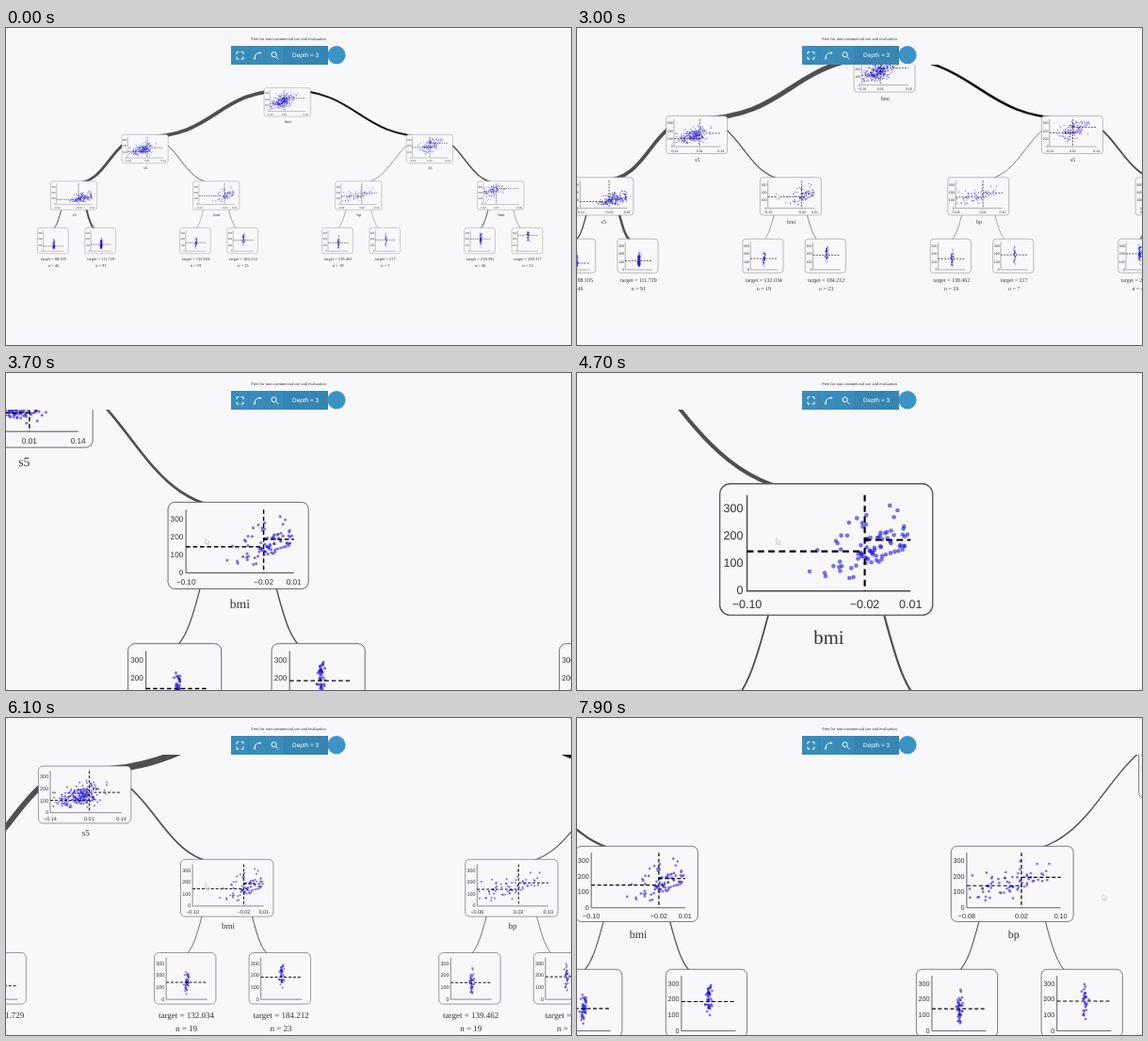
These frames come from a looping animation (600x337 px, 8 s). An HTML page:

```html
<!DOCTYPE html>
<html lang="en">
<head>
<meta charset="utf-8">
<title>Decision tree zoom</title>
<style>
  html, body { margin: 0; width: 100%; height: 100%; overflow: hidden; background: #f8f7fa; }
  svg { display: block; width: 100%; height: 100%; text-rendering: geometricPrecision; }
  text { text-anchor: middle; fill: #333; }
  .serif { font: 4.5px "Liberation Serif", serif; }
  .tick { font: 2.72px "Liberation Sans", sans-serif; }
  .end { text-anchor: end; }
  .box { fill: #f8f7fa; stroke: #5c5c60; stroke-width: .3; }
  .axis { fill: none; stroke: #4a4a4e; stroke-width: .32; }
  .dash { fill: none; stroke: #000; stroke-width: .46; stroke-dasharray: 1.5 .95; }
  .dots { fill: #2218dc; fill-opacity: .6; }
  .link { fill: none; stroke: #4f4f52; }
  .icon { fill: none; stroke: #fff; stroke-width: 1; }
</style>
</head>
<body>
<svg viewBox="0 0 600 337">
  <clipPath id="stage"><rect y="39" width="600" height="298"/></clipPath>
  <g clip-path="url(#stage)"><g id="tree"></g></g>
  <text class="serif" x="300" y="12.6">Free for non-commercial use and evaluation</text>
  <rect x="239" y="19" width="103" height="20" fill="#3a8cba"/>
  <rect x="295" y="19" width="47" height="20" fill="#3785b2"/>
  <path d="M257.5 19v20M276 19v20M295 19v20" stroke="#3481ae" stroke-width=".6"/>
  <path class="icon" d="M245 28v-2.5h2.3M249.7 25.5h2.3v2.5M252 30.5v2.5h-2.3M247.3 33h-2.3v-2.5"/>
  <path class="icon" d="M264 32.5c0-4 2-6 6-6"/>
  <g fill="#fff"><circle cx="264" cy="32.5" r="1.1"/><circle cx="270" cy="26.5" r="1.1"/></g>
  <path class="icon" d="M286.6 30.4l2.7 2.8"/>
  <circle class="icon" cx="284.6" cy="28.2" r="2.6"/>
  <text x="318" y="31.4" style="font:6.4px 'Liberation Sans',sans-serif;fill:#fff">Depth = 3</text>
  <circle cx="351" cy="28.7" r="9.6" fill="#3b93c6"/>
  <path id="cursor" d="M0 0v6.6l1.6-1.5 1.1 2.5 1.1-.5-1.1-2.4h2z" fill="#fbfbfd" stroke="#acacb2" stroke-width=".5"/>
</svg>
<script>
const LOOP = 8000, TOP = 63.65, ROW = 49.6, MIDDLE = 298.7, SPAN = 604.4;
const LEAF_GAP = 25.15, LEAF_SHIFT = 2.9;
const AXIS_X = 6.3, AXIS_TOP = 2.6, WIDE_END = 44.1, LEAF_END = 28.1;
const rowY = row => TOP + row * ROW;
const valueY = v => 24.8 - v * .0631;

let seed = 11;
const rnd = () => (seed = seed * 16807 % 2147483647) / 2147483647;
const gauss = () => 1.4 * (rnd() + rnd() + rnd() + rnd() + rnd() + rnd() - 3);
const reflect = (v, lo, hi) => v < lo ? 2 * lo - v : v > hi ? 2 * hi - v : v;
const text = (x, y, s, cls) => `<text class="${cls}" x="${x}" y="${y}">${s}</text>`;
const line = (d, cls) => `<path class="${cls}" d="${d}"/>`;

// Correlated normal scatter, folded back at the plot edges.
function cloud(n, cx, sx, mean, sd, corr, end) {
  let out = '';
  for (let i = 0; i < n; i++) {
    const g = gauss(), h = gauss();
    const x = reflect(cx + sx * g, AXIS_X + 1, end - .4);
    const v = reflect(mean + sd * (corr * g + Math.sqrt(1 - corr * corr) * h), 45, 325);
    out += `<circle cx="${x.toFixed(2)}" cy="${valueY(v).toFixed(2)}" r=".5"/>`;
  }
  return `<g class="dots">${out}</g>`;
}

// Splits in heap order; cx and sx place the scatter along x.
const split = (name, ticks, cut, left, right, cx, sx = 6) =>
  ({ name, ticks: ticks.split(' '), cut, left, right, cx, sx });
const leaf = (label, n, level) => ({ label, n, level });
const nodes = [
  split('bmi', '−0.10 0.01 0.16', 21.3, 125, 218, 20),
  split('s5', '−0.14 0.01 0.14', 27, 104, 171, 22),
  split('s5', '−0.12 0.01 0.14', 25, 177, 248, 25.5),
  split('s5', '−0.14 −0.03 0.01', 29.6, 84, 114, 33),
  split('bmi', '−0.10 −0.02 0.01', 33.5, 145, 187, 36.5, 7),
  split('bp', '−0.08 0.02 0.10', 28.3, 141, 195, 25, 9),
  split('bmi', '0.01 0.07 0.16', 20, 212, 268, 16),
  leaf('88.105', 46, 84), leaf('111.729', 91, 114),
  leaf('132.034', 19, 143), leaf('184.212', 23, 187),
  leaf('139.462', 19, 141), leaf('217', 7, 190),
  leaf('218.392', 46, 205), leaf('269.317', 22, 268)
];
const parent = i => nodes[(i - 1) >> 1];

nodes.forEach((node, i) => {
  node.row = Math.floor(Math.log2(i + 1));
  const count = 2 ** node.row, k = i + 1 - count;
  node.x = node.label ? parent(i).x + (k % 2 ? LEAF_GAP : -LEAF_GAP)
    : MIDDLE + ((k + .5) / count - .5) * SPAN;
});
for (let i = nodes.length - 1; i > 0; i--) parent(i).n = (parent(i).n || 0) + nodes[i].n;

// Line width follows the number of samples in the branch.
function link(node, i) {
  if (!i) return '';
  const from = parent(i).x, to = node.x, mid = (from + to) / 2;
  const y1 = rowY(node.row) + 2.4, y0 = y1 - ROW, color = i === 2 ? '#111' : '#4f4f52';
  return `<path class="link" style="stroke:${color}" stroke-width="${Math.max(.35, node.n / 48)}"
    d="M${from} ${y0}C${mid} ${y0} ${mid} ${y1} ${to} ${y1}"/>`;
}

function frame(x, row, w, h, end, body) {
  const ticks = [0, 100, 200, 300].map(v => text(AXIS_X - .9, valueY(v) + .8, v, 'tick end')).join('');
  return `<g transform="translate(${x - w / 2} ${rowY(row)})"><rect class="box" width="${w}" height="${h}" rx="2.4"/>`
    + line(`M${AXIS_X} ${AXIS_TOP}V${valueY(0)}H${end}`, 'axis') + ticks + body + '</g>';
}

function drawSplit(s) {
  const at = [AXIS_X, s.cut, WIDE_END], mean = (s.left + s.right) / 2;
  const body = cloud(s.n + 42, s.cx, s.sx, mean, 30 + .17 * mean, .45, WIDE_END)
    + line(`M${s.cut} ${AXIS_TOP}V${valueY(0)}M${AXIS_X} ${valueY(s.left)}H${s.cut}M${s.cut} ${valueY(s.right)}H${WIDE_END}`, 'dash')
    + s.ticks.map((v, i) => text(at[i], 28.9, v, 'tick')).join('')
    + text(25.2, 37.1, s.name, 'serif');
  return frame(s.x, s.row, 49.2, 30.4, WIDE_END, body);
}

function drawLeaf(l) {
  const body = cloud(l.n + 22, 17.4, .6, l.level, 52, 0, LEAF_END)
    + line(`M${AXIS_X} ${valueY(l.level)}H${LEAF_END}`, 'dash')
    + text(17, 34.5, 'target = ' + l.label, 'serif') + text(17, 41.5, 'n = ' + l.n, 'serif');
  return frame(l.x + LEAF_SHIFT, l.row, 32.7, 27.3, LEAF_END, body);
}

const tree = document.getElementById('tree'), cursor = document.getElementById('cursor');
tree.innerHTML = nodes.map(link).join('')
  + nodes.map(node => node.label ? drawLeaf(node) : drawSplit(node)).join('');

// Wheel bursts: first and last step time, first and last power of two.
const STEP = 100, zooms = [];
for (const [t0, t1, p0, p1] of [
  [3000, 3400, .4, 1.4], [3700, 4300, 1.6, 2.2], [5500, 5800, 2, 1.2],
  [6100, 6300, 1, .8], [7800, 7900, 1.2, 1.4]
]) for (let t = t0; t <= t1; t += STEP) zooms.push([t, p0 + (p1 - p0) * (t - t0) / (t1 - t0)]);

const moves = [[1300, 334, 322], [1400, 330, 288.5], [2100, 236, 196], [2500, 211.6, 175.4],
  [6500, 211.6, 175.4], [7300, 545, 192], [7600, 558, 187]];

function pointer(t) {
  const i = moves.findIndex(m => m[0] > t);
  if (i < 1) return moves.at(i).slice(1);
  const [a, b] = [moves[i - 1], moves[i]], p = (t - a[0]) / (b[0] - a[0]);
  return [a[1] + (b[1] - a[1]) * p, a[2] + (b[2] - a[2]) * p];
}

// Each step scales the tree about the pointer.
function camera(t) {
  let k = 1, x = 0, y = 0;
  for (const [time, power] of zooms) {
    if (time > t) break;
    const [px, py] = pointer(time), next = 2 ** power, r = next / k;
    x = px - (px - x) * r;
    y = py - (py - y) * r;
    k = next;
  }
  return `translate(${x} ${y}) scale(${k})`;
}

let start;
function draw(now) {
  start ??= now;
  const t = (now - start) % LOOP;
  tree.setAttribute('transform', camera(t));
  cursor.setAttribute('transform', `translate(${pointer(t)})`);
  cursor.setAttribute('visibility', t < moves[0][0] ? 'hidden' : 'visible');
  requestAnimationFrame(draw);
}
requestAnimationFrame(draw);
</script>
</body>
</html>
```
